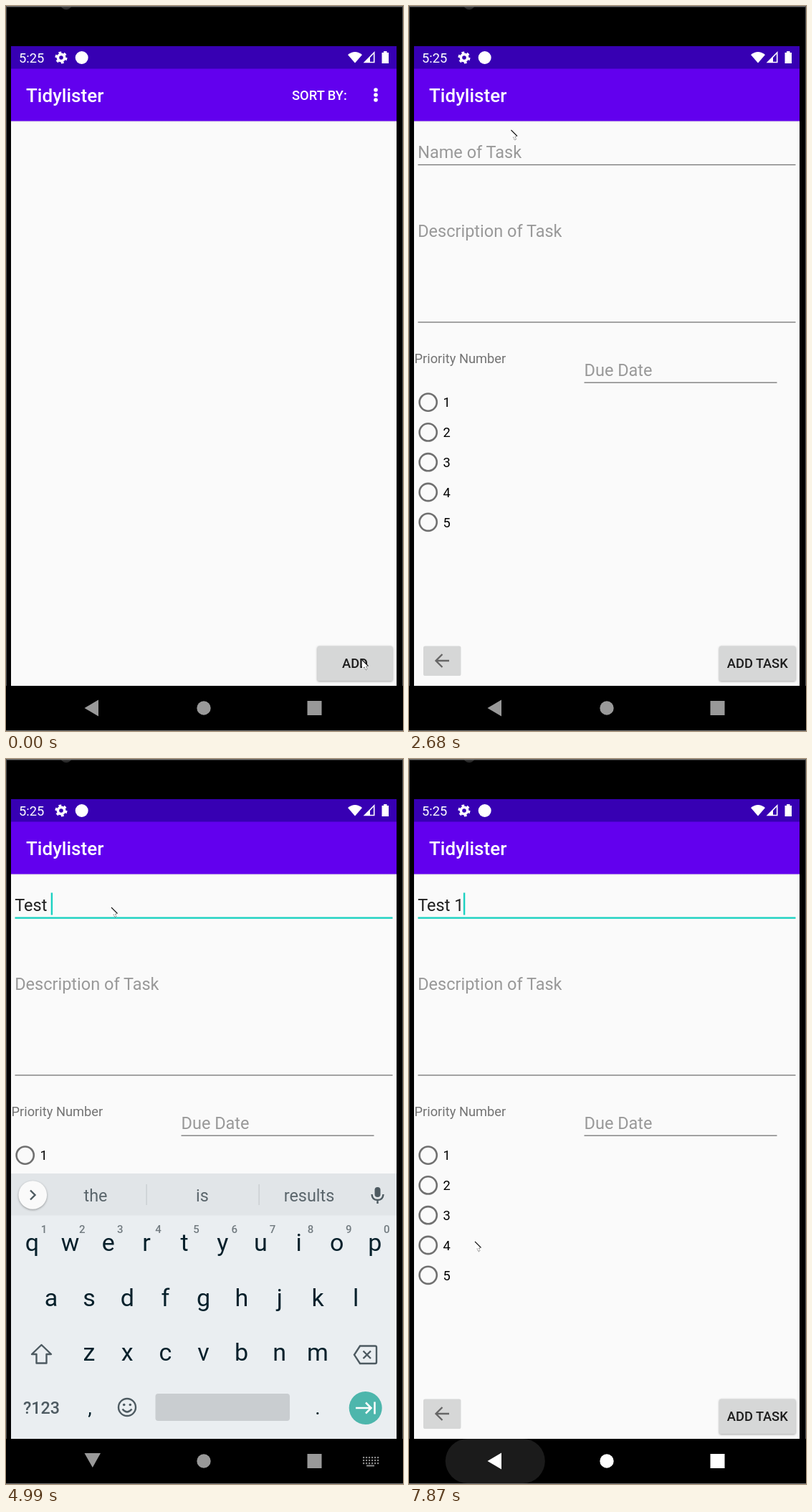
Recreate the animation shown at these times as an HTML page. Size 554 by 1011 pixels, loop 8 s.

```html
<!DOCTYPE html>
<html lang="en">
<head>
<meta charset="utf-8">
<title>Task list app</title>
<style>
  html, body { margin: 0; width: 100%; height: 100%; overflow: hidden; background: #000; }
  svg { display: block; width: 554px; height: 1011px; }
  text { font-family: Roboto, Arial, sans-serif; white-space: pre; }
  .field { font-size: 23.5px; }
  .hint { fill: #999; }
  .small { font-size: 18.3px; }
  .medium { font-weight: 500; }
  .mid { text-anchor: middle; }
  .raised { filter: drop-shadow(0 1.5px 1.5px rgba(0, 0, 0, .35)); }
  .key { font-size: 34px; fill: #07202b; text-anchor: middle; }
  .digit { font-size: 15px; font-weight: 500; fill: #727b80; text-anchor: middle; }
  .word { font-size: 23.4px; fill: #5b666c; text-anchor: middle; }
  .icon { fill: none; stroke: #4d5a61; stroke-width: 2.4; }
</style>
</head>
<body>
<svg id="stage" viewBox="0 0 554 1011"></svg>
<script>
const LOOP = 8000;
const stage = document.getElementById('stage');

const rect = (x, y, w, h, fill, more = '') =>
  `<rect x="${x}" y="${y}" width="${w}" height="${h}" fill="${fill}" ${more}/>`;
const circle = (x, y, r, fill, more = '') =>
  `<circle cx="${x}" cy="${y}" r="${r}" fill="${fill}" ${more}/>`;
const path = (d, more = '') => `<path d="${d}" ${more}/>`;
const text = (x, y, label, kind, more = '') =>
  `<text x="${x}" y="${y}" class="${kind}" ${more}>${label}</text>`;
const group = (id, body, more = '') => `<g id="${id}" ${more}>${body}</g>`;

const windowBase = rect(7, 56, 538, 892, '#fafafa')
  + rect(7, 160, 538, 3, 'url(#shade)')
  + rect(7, 56, 538, 32, '#3700b3')
  + rect(7, 87.5, 538, 73, '#6200ee')
  + text(28, 134, 'Tidylister', 'medium', 'font-size="26" fill="#fff"');

const button = (x, w, label) =>
  rect(x, 892.5, w, 48.5, '#d6d7d7', 'rx="2.6" class="raised"')
  + text(x + w / 2, 923, label, 'small medium mid', 'fill="#1c1c1c"');

function homeScreen() {
  const dots = [117, 124, 131].map(y => circle(516, y, 2.8, '#fff')).join('');
  return windowBase + text(399, 131, 'SORT BY:', 'small medium', 'fill="#fff"') + dots
    + button(434.5, 105, 'ADD')
    + rect(453, 892.5, 82, 48, '#000', 'id="press" rx="22" opacity=".1"');
}

function formScreen() {
  let radios = '';
  for (let i = 0; i < 5; i++) {
    const y = 552.6 + i * 41.8;
    radios += circle(26.7, y, 12.1, 'none', 'stroke="#707070" stroke-width="2.6"')
      + text(47.5, y + 6.8, i + 1, 'small', 'fill="#000"');
  }
  return windowBase
    + text(12.2, 211.5, 'Name of Task', 'field hint', 'id="nameHint"')
    + text(12.2, 211.5, '', 'field', 'id="name" fill="#202020"')
    + rect(12.5, 212.6, 0, 1.5, '#202020', 'id="composing"')
    + rect(25.8, 186.5, 2.4, 31, '#1bd1c1', 'id="caret"')
    + rect(12.5, 220.8, 527, 1.3, '#757575', 'id="nameLine"')
    + text(12.2, 322, 'Description of Task', 'field hint')
    + rect(12.5, 440.3, 527, 1.3, '#757575')
    + text(7.5, 498, 'Priority Number', 'small', 'fill="#737373"')
    + text(244.5, 515.5, 'Due Date', 'field hint')
    + rect(244.5, 524.5, 269, 1.3, '#757575')
    + radios
    + rect(20, 892.5, 52.5, 41.5, '#d6d7d7', 'rx="2.6"')
    + path('M56 913H38M46.500 904L37.500 913L46.500 922', 'fill="none" stroke="#666" stroke-width="2.3"')
    + button(433, 106.5, 'ADD TASK');
}

function keyboard() {
  const row = (letters, x, y) => [...letters]
    .map((c, i) => text(x + i * 53.15, y, c, 'key')).join('');
  const digits = [...'1234567890']
    .map((c, i) => text(53 + i * 53.15, 661, c, 'digit')).join('');
  const tools = circle(108, 606, 6.5, 'none', 'class="icon"')
    + path('M113 611L121 619', 'class="icon" stroke-width="3"')
    + path('M180 598.500H196.500V610L189.500 617.500H180Q178.500 617.500 178.500 616V600Q178.500 598.500 180 598.500ZM189.500 617V610H196.500M182.500 609Q185 614 189 611', 'class="icon" stroke-width="2"')
    + circle(184, 604.5, 1.5, '#4d5a61') + circle(191.5, 604.5, 1.5, '#4d5a61')
    + text(266, 614.5, 'GIF', 'mid', 'font-size="19.5" font-weight="700" fill="#5b666c"')
    + rect(336, 598, 21, 21, '#5f6a70', 'rx="1.5"')
    + rect(393, 594, 1.2, 28, '#c6cbce')
    + [434, 442, 450].map(x => circle(x, 608, 2.6, '#4d5a61')).join('')
    + path('M41 601.500L34.500 608L41 614.500', 'class="icon"');
  const words = [125, 274, 423]
    .map((x, i) => text(x, 617, '', 'word', `id="word${i}"`)).join('')
    + rect(195.5, 593, 1.2, 29, '#c6cbce') + rect(352.5, 593, 1.2, 29, '#c6cbce')
    + path('M34 601.500L40.500 608L34 614.500', 'class="icon"');
  const mic = rect(514.5, 597, 8, 14, '#4d5a61', 'rx="4"')
    + path('M510.500 607Q511 615 518.500 615T526.500 607M518.500 615V620', 'class="icon" stroke-width="2"');

  return rect(7, 578, 538, 370, '#eaeef1') + rect(7, 578, 538, 58.5, '#e1e5e8')
    + circle(37.3, 608, 19.8, '#fafafa', 'class="raised"')
    + group('tools', tools) + group('words', words) + mic
    + digits + row('qwertyuiop', 36.5, 686) + row('asdfghjkl', 63, 762.5) + row('zxcvbnm', 116, 839)
    + path('M49.500 817L63 830H56.500V842.500H42.500V830H36Z', 'class="icon" stroke-linejoin="round"')
    + path('M494 818.500H515Q517 818.500 517 820.500V841Q517 843 515 843H494L486 830.800ZM498.500 825.500L509 836M509 825.500L498.500 836', 'class="icon"')
    + text(49.5, 912.5, '?123', 'medium mid', 'font-size="23.3" fill="#4d5a61"')
    + text(117, 914, ',', 'key', 'style="font-size:28px"')
    + text(435, 914, '.', 'key', 'style="font-size:28px"')
    + circle(169, 904, 12, 'none', 'class="icon"')
    + circle(164.7, 900.5, 1.8, '#4d5a61') + circle(173.3, 900.5, 1.8, '#4d5a61')
    + path('M162.500 906.500Q169 914.500 175.500 906.500', 'class="icon" stroke-width="2"')
    + rect(208.5, 885, 187.5, 38, '#c9cdd0', 'rx="4"')
    + circle(501.7, 905, 23, '#4db6ac')
    + path('M488 905H509M502 897.500L509.500 905L502 912.500M514.500 896.500V913.500', 'fill="none" stroke="#fff" stroke-width="2.5"');
}

function statusIcons() {
  return text(18, 78.7, '5:25', 'small', 'fill="#fff"')
    + circle(77, 72, 4.6, 'none', 'stroke="#fff" stroke-width="3.6"')
    + circle(77, 72, 7, 'none', 'stroke="#fff" stroke-width="3" stroke-dasharray="3.66 3.67"')
    + circle(105.7, 72, 9, '#fff')
    + path('M477 68Q487 60 497 68L487 79.500Z', 'fill="#fff"')
    + path('M513.700 65V78.500H500.500Z', 'fill="none" stroke="#fff" stroke-width="1.6"')
    + path('M508 70.500V78.500H500.500Z', 'fill="#fff"')
    + path('M527 63H531.500V65H534V80H524.500V65H527Z', 'fill="#fff"');
}

function navBar() {
  let dots = '';
  for (let y = 973; y < 982; y += 4)
    for (let x = 498; x < 520; x += 4) dots += rect(x, y, 2.2, 2.2, '#8a8a8a');
  return rect(0, 948, 554, 62, '#000')
    + rect(93, 948, 54, 62, '#212121', 'id="ripple"')
    + group('navIcons',
      path('M109.500 979L129 967.500V990.500Z', 'id="back"')
      + path('M109.500 968H132L120.800 988Z', 'id="hide"')
      + circle(276, 979, 9.7, 'inherit', 'style="fill:inherit"')
      + rect(420.5, 969, 20, 20, 'inherit', 'style="fill:inherit"'))
    + group('imeIcon', dots + rect(503, 984.5, 11, 2, '#8a8a8a'));
}

stage.innerHTML = `<defs>
  <clipPath id="screen"><rect x="7" y="56" width="538" height="892"/></clipPath>
  <linearGradient id="shade" x2="0" y2="1"><stop stop-color="#e4e4e4"/><stop offset="1" stop-color="#fafafa"/></linearGradient>
  </defs>`
  + rect(0, 0, 554, 1011, '#000')
  + circle(84, -3, 8, '#2b2b2b')
  + rect(0, 0, 554, 1.4, '#777') + rect(0, 0, 1, 1011, '#555') + rect(553, 0, 1, 1011, '#555')
  + group('view', group('home', homeScreen()) + group('form', formScreen()) + group('keys', keyboard()),
    'clip-path="url(#screen)"')
  + statusIcons() + navBar() + rect(0, 1010, 554, 1, '#777')
  + group('pointer',
    path('M0 0V12L3 9.700L5 14L7 13L5.300 9H9Z', 'fill="#fff"')
    + path('M0 0L8.500 8.500', 'stroke="#111" stroke-width="1.1"')
    + path('M3 9.700L5 14L7 13L5.300 9H8', 'fill="none" stroke="#555" stroke-width="1" stroke-dasharray="1.2 1.2"'));

const el = {};
stage.querySelectorAll('[id]').forEach(node => { el[node.id] = node; });

// Each row: start time, then the values held until the next row.
const pointerSteps = [
  [0, 497, 912], [1380, 478, 856], [1500, 433, 706], [1650, 352, 612], [1900, 332, 589],
  [2310, 300, 520], [2430, 215, 340], [2560, 146, 169], [2680, 142.5, 173], [2820, 144, 192],
  [2940, 147, 207], [6030, 142, 265], [6180, 150, 330], [6320, 200, 450], [6460, 240, 590],
  [6590, 243, 720], [6720, 220, 850], [6860, 170, 945], [7000, 130, 985], [7150, 118, 979],
  [7290, 115, 976], [7870, 92, 673]
];
const windowSteps = [[0, 1, 0.85, 0], [1650, 1.06, 0.94, 0.9], [1780, 1.1, 0.99, 1], [1900, 1.1, 1, 1]];
const keySteps = [[0, 400], [3360, 260], [3500, 90], [3640, 15], [3770, 0], [7720, 170], [7870, 400]];
const caretSteps = [[0, 0], [3220, 1], [3770, 0], [4080, 1], [5580, 0], [6180, 1], [6590, 0], [7150, 1]];
const rippleSteps = [[0, 0], [7430, 32], [7580, 54], [7720, 100], [7870, 139]];
const typing = [
  [0, '', ''], [4080, 'T', 'T,Take,Thanks'], [4230, 'Te', 'Te,Tell,Test'],
  [4390, 'Tes', 'Tes,Test,Tests'], [4540, 'Test', 'Test,Tests,Testing'],
  [4990, 'Test ', 'the,is,results'], [5140, 'Test 1', '1,1st,10'], [5580, 'Test 1', '']
];

const at = (steps, t) => steps.filter(step => step[0] <= t).pop().slice(1);
const show = (node, on) => node.setAttribute('visibility', on ? 'inherit' : 'hidden');
const set = (node, values) => Object.entries(values).forEach(([k, v]) => node.setAttribute(k, v));
const zoom = s => `translate(276 502) scale(${s}) translate(-276 -502)`;

function drawName(t) {
  const [name, suggestions] = at(typing, t);
  const focused = t >= 3220;
  el.name.textContent = name;
  const width = name ? el.name.getComputedTextLength() : 0;
  show(el.nameHint, !name);
  show(el.caret, at(caretSteps, t)[0]);
  set(el.caret, { x: 11.7 + width });
  set(el.composing, { width: t >= 4080 && t < 4990 ? width : 0 });
  set(el.nameLine, focused
    ? { y: 220.4, height: 2.4, fill: '#1bd1c1' }
    : { y: 220.8, height: 1.3, fill: '#757575' });
  show(el.tools, !suggestions);
  show(el.words, suggestions);
  suggestions.split(',').forEach((word, i) => { el['word' + i].textContent = word; });
}

function drawNav(t, offset) {
  const open = offset < 200;
  const width = at(rippleSteps, t)[0];
  show(el.back, !open);
  show(el.hide, open);
  show(el.imeIcon, open);
  set(el.navIcons, { fill: t >= 7870 ? '#fff' : '#999' });
  set(el.ripple, {
    x: 120.3 - width / 2, width, rx: Math.min(31, width / 2),
    fill: t >= 7870 ? '#1b1b1b' : '#212121'
  });
}

function draw(t) {
  const [homeScale, formScale, formAlpha] = at(windowSteps, t);
  const [x, y] = at(pointerSteps, t);
  const [offset] = at(keySteps, t);
  set(el.home, { transform: zoom(homeScale) });
  set(el.form, { transform: zoom(formScale), opacity: formAlpha });
  show(el.home, t < 1900);
  show(el.press, t >= 500 && t < 1100);
  set(el.keys, { transform: `translate(0 ${offset})` });
  set(el.pointer, { transform: `translate(${x} ${y})` });
  drawName(t);
  drawNav(t, offset);
}

const start = performance.now();
function tick() {
  draw((performance.now() - start) % LOOP);
  requestAnimationFrame(tick);
}
tick();
</script>
</body>
</html>
```
